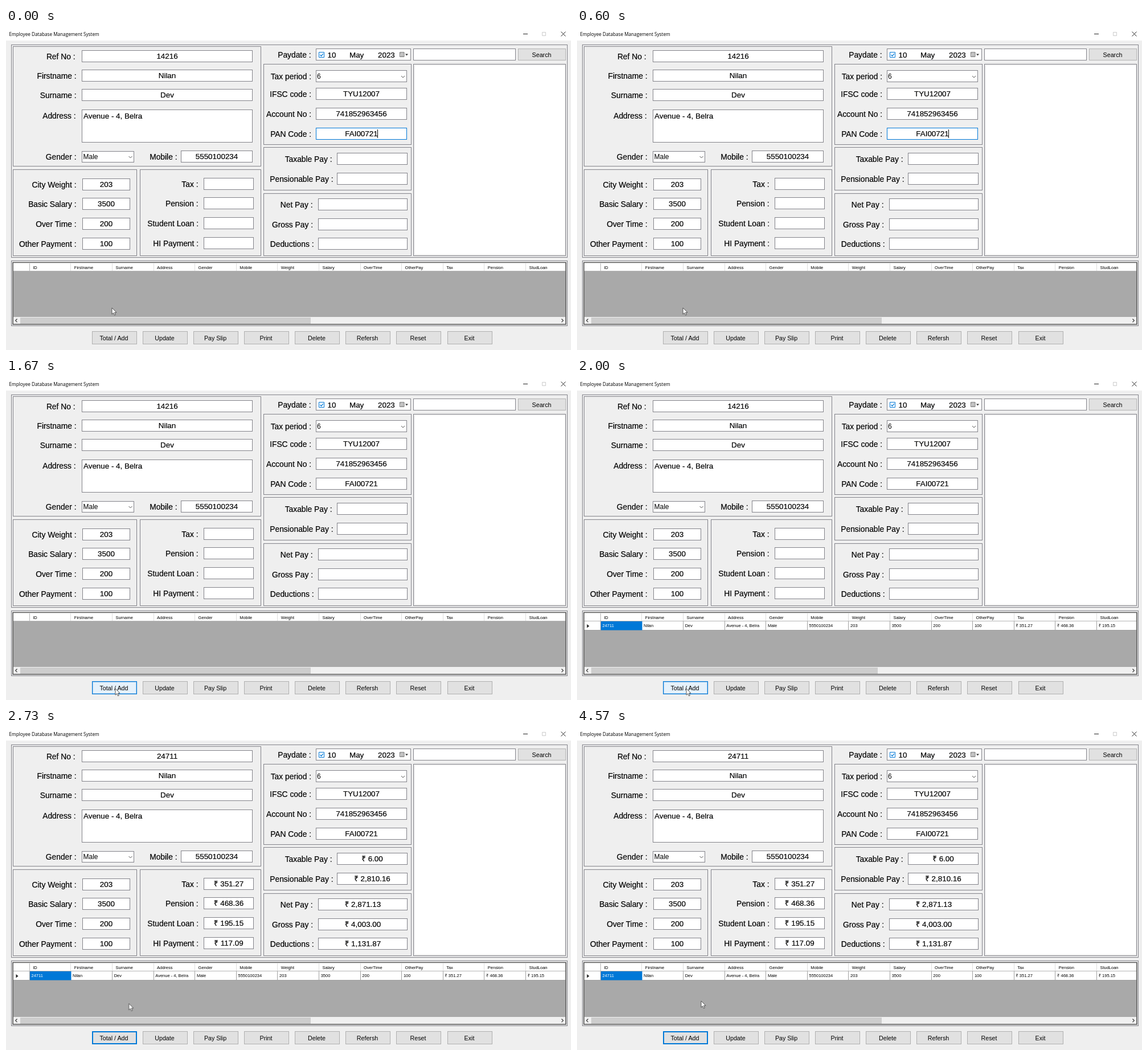
Write an HTML page that moves like this. It is 992 px wide and 565 px high and loops after 4630 ms.

```html
<!DOCTYPE html>
<html lang="en">
<head>
<meta charset="utf-8">
<title>Employee Database Management System</title>
<style>
  html, body { margin: 0; width: 100%; height: 100%; overflow: hidden; background: #efefef; }
  svg { display: block; width: 992px; height: 565px; }
  text { font-family: "Liberation Sans", Arial, sans-serif; fill: #000; white-space: pre; }
  .title { font: 8.2px "Open Sans", sans-serif; }
  .label { font-size: 13.8px; text-anchor: end; }
  .value { font-size: 13.4px; }
  .label, .value { stroke: #000; stroke-width: .2px; }
  .combo { font-size: 12px; }
  .mid { text-anchor: middle; }
  .cell { font-size: 7.5px; }
  .btn { font-size: 10.7px; text-anchor: middle; }
</style>
</head>
<body>
<svg id="stage" viewBox="0 0 992 565"></svg>
<script>
const LOOP = 4630, HOVER = 1310, CLICK = 1600, ROW = 1750, FILL = 2200, LEAVE = 2260;
const person = { first: "Nilan", last: "Dev", address: "Avenue - 4, Belra", phone: "5550100234" };
const LINE = "#83838a", BLUE = "#0078d7";

const rect = (x, y, w, h, fill, stroke = "none", sw = 1) =>
  `<rect x="${x}" y="${y}" width="${w}" height="${h}" fill="${fill}" stroke="${stroke}" stroke-width="${sw}"/>`;
const box = (x, y, w, h, fill = "#fff", stroke = LINE) => rect(x + .5, y + .5, w - 1, h - 1, fill, stroke);
const path = (d, stroke, sw = 1, fill = "none") =>
  `<path d="${d}" fill="${fill}" stroke="${stroke}" stroke-width="${sw}"/>`;
const text = (s, x, y, cls, fill = "#000") => `<text x="${x}" y="${y}" class="${cls}" style="fill:${fill}">${s}</text>`;
// A group visible only between two times of the loop
const during = (from, to, body) => `<g data-from="${from}" data-to="${to}">${body}</g>`;
const chevron = (x, y) => path(`M${x - 3} ${y - 1.5}l3 3l3 -3`, "#555");

// label, label right edge, box x, y, width, value, value shown once the totals are in
const fields = [
  ["Ref No :", 121.5, 133, 39, 300, "14216", "24711"],
  ["Firstname :", 123.5, 133, 73, 300, person.first],
  ["Surname :", 123.5, 133, 107, 300, person.last],
  ["Mobile :", 300.5, 307, 215, 126, person.phone],
  ["City Weight :", 123.5, 134, 264, 84, "203"],
  ["Basic Salary :", 123.5, 134, 298, 84, "3500"],
  ["Over Time :", 123.5, 134, 333, 84, "200"],
  ["Other Payment :", 123.5, 134, 368, 84, "100"],
  ["Tax :", 337.5, 347, 263, 88, "", "₹ 351.27"],
  ["Pension :", 337.5, 347, 297, 88, "", "₹ 468.36"],
  ["Student Loan :", 338, 347, 332, 88, "", "₹ 195.15"],
  ["HI Payment :", 338, 347, 367, 88, "", "₹ 117.09"],
  ["IFSC code :", 536, 544, 105, 160, "TYU12007"],
  ["Account No :", 536, 544, 140, 160, "741852963456"],
  ["PAN Code :", 536, 544, 175, 160, "FAI00721"],
  ["Taxable Pay :", 572.5, 581, 219, 124, "", "₹ 6.00"],
  ["Pensionable Pay :", 574.5, 581, 254, 124, "", "₹ 2,810.16"],
  ["Net Pay :", 538.5, 548, 299, 157, "", "₹ 2,871.13"],
  ["Gross Pay :", 539, 548, 334, 157, "", "₹ 4,003.00"],
  ["Deductions :", 540.5, 548, 368, 157, "", "₹ 1,131.87"]
];

function field([label, right, x, y, w, before, after]) {
  const value = s => text(s, x + w / 2, y + 15, "value mid");
  return text(label, right, y + 15.5, "label") + box(x, y, w, 21) +
    (after ? during(0, FILL, value(before)) + during(FILL, LOOP, value(after)) : value(before));
}

function titleBar() {
  return rect(0, 0, 992, 22, "#fff") +
    text("Employee Database Management System", 5.5, 14, "title") +
    path("M908 10.5h8", "#222") + path("M941.5 7.5h6v6h-6z", "#ccc") + path("M974.5 6.5l8 8m0 -8l-8 8", "#222");
}

function panels() {
  return [
    [9, 29, 977, 374], [12, 32, 436, 211], [452, 63, 260, 142], [452, 209, 260, 76],
    [452, 290, 260, 110], [12, 248, 218, 152], [235, 248, 213, 152], [9, 408, 977, 115], [715, 63, 268, 337]
  ].map(p => box(...p, "none")).join("") + rect(718, 66, 263, 331, "#fff");
}

function extras() {
  return text("Address :", 122.5, 158.5, "label") + box(133, 143, 300, 58) +
    text(person.address, 136, 158.5, "value") +
    text("Gender :", 123.5, 230.5, "label") + box(133, 216, 92, 20) +
    text("Male", 135.5, 230, "combo") + chevron(218.5, 226.5) +
    text("Tax period :", 536, 89.5, "label") + box(544, 74, 160, 21) +
    text("6", 546, 88.5, "combo") + chevron(697, 85.5) +
    text("Paydate :", 535.5, 51.5, "label") + box(544, 36, 167, 21) +
    path("M549.5 42.5h9v9h-9z", BLUE, 1) + path("M551.5 47l2 2.2l3.5 -4.4", BLUE, 1.2) +
    text("10", 564.5, 51.5, "value") + text("May", 603, 51.5, "value") + text("2023", 653, 51.5, "value") +
    path("M691.5 42.5h7.5v8h-7.5z", "#777", 1, "#ddd") + path("M692 44.5h7M693 47h5M693 49h5", "#888", .8) +
    path("M701 45.5h5l-2.5 3z", "none", 0, "#333") +
    box(715, 36, 180, 21) + box(899, 36, 84, 21, "#e1e1e1", "#b4b4b4") + text("Search", 940.5, 50.5, "btn") +
    during(0, CLICK, path("M544.5 175.5h159v20h-159z", BLUE) + path("M652.5 178v15", "#000"));
}

function table() {
  const heads = ["ID", "Firstname", "Surname", "Address", "Gender", "Mobile", "Weight", "Salary",
    "OverTime", "OtherPay", "Tax", "Pension", "StudLoan"];
  const cells = ["24711", person.first, person.last, person.address, "Male", person.phone, "203", "3500",
    "200", "100", "₹ 351.27", "₹ 468.36", "₹ 195.15"];
  const colX = i => 41.7 + 72.6 * i;
  const lines = (y, h) => heads.map((_, i) => `M${Math.round(colX(i)) - .5} ${y}v${h}`).join("");
  const row = rect(13, 427, 969, 15.5, "#fff") +
    path(lines(427, 16) + "M13 442.5h969", "#a0a0a0") + rect(42, 427, 72.5, 15.5, BLUE) +
    path("M17.5 432l4 3.2l-4 3.2z", "none", 0, "#222") +
    cells.map((s, i) => text(s, colX(i) + 2.8, 437.4, "cell", i ? "#000" : "#fff")).join("");
  const thumb = w => rect(25, 508, w, 11, "#cdcdcd");
  return rect(12, 411, 971, 109, "#a9a9a9") + rect(13, 412, 969, 14.5, "#fff") +
    path(lines(413, 13), "#ddd") + path("M41.5 413v13M13 426.5h969", "#b5b5b5") +
    heads.map((s, i) => text(s, colX(i) + 5.5, 422.5, "cell")).join("") +
    during(ROW, LOOP, row) +
    rect(13, 507, 969, 12.5, "#f0f0f0") +
    during(0, ROW, thumb(510)) + during(ROW, FILL, thumb(503)) + during(FILL, LOOP, thumb(510)) +
    path("M19.5 510.5l-2.8 2.8l2.8 2.8M975.5 510.5l2.8 2.8l-2.8 2.8", "#333", 1.2) +
    rect(12, 411.5, 971, 108.5, "none", "#444", 1.3);
}

function buttons() {
  const names = ["Total / Add", "Update", "Pay Slip", "Print", "Delete", "Refersh", "Reset", "Exit"];
  const x = i => Math.floor(151 + 89.15 * i);
  const faces = names.map((_, i) => box(x(i), 532, 79, 23, "#e1e1e1", "#b0b0b0")).join("");
  const labels = names.map((s, i) => text(s, x(i) + 38.5, 547.5, "btn")).join("");
  return faces + during(HOVER, LEAVE, box(151, 532, 79, 23, "#e5f1fb", BLUE)) +
    during(CLICK, LEAVE, box(152, 533, 77, 21, "none", "#8fc0ea")) +
    during(LEAVE, LOOP, rect(152, 533, 77, 21, "none", BLUE, 2)) + labels;
}

const cursor = `<g id="cursor">${path("M0 0V11.2L2.6 8.8L4.5 12.9L6.3 12.1L4.5 8.1H8Z", "#333", .8, "#fff")}</g>`;

document.getElementById("stage").innerHTML =
  rect(0, 0, 992, 565, "#efefef") + titleBar() + panels() + fields.map(field).join("") +
  extras() + table() + buttons() + cursor;

const timing = { duration: LOOP, iterations: Infinity };

document.querySelectorAll("[data-from]").forEach(el => {
  const from = +el.dataset.from, to = +el.dataset.to;
  const frames = [];
  if (from > 0) frames.push([0, 0]);
  frames.push([from, 1]);
  if (to < LOOP) frames.push([to, 0]);
  frames.push([LOOP, to < LOOP ? 0 : 1]);
  el.animate(frames.map(([t, opacity]) => ({ offset: t / LOOP, opacity, easing: "step-end" })), timing);
});

// time, x, y of the pointer tip
const track = [
  [0, 186, 491], [950, 186, 491], [1270, 189.5, 528], [1450, 192, 545], [2170, 192, 545],
  [2600, 215.7, 483.5], [2760, 215.7, 483.5], [3100, 218, 479], [LOOP, 218, 479]
];
document.getElementById("cursor").animate(track.map(([t, x, y]) => ({
  offset: t / LOOP, transform: `translate(${x}px, ${y}px)`, easing: "ease-in-out"
})), timing);
</script>
</body>
</html>
```
